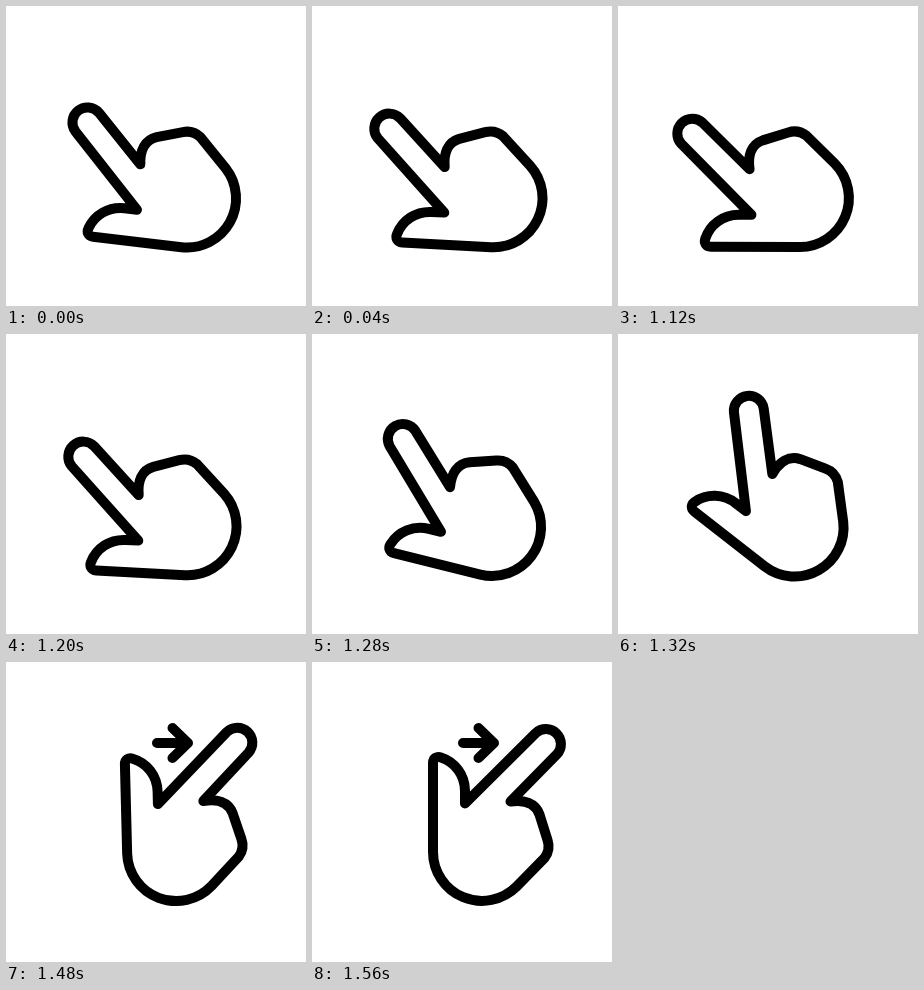
Write an HTML page with a canvas that moves like this. It is 300 px wide and 300 px high and loops after 2.56 s.

```html
<!DOCTYPE html>
<html lang="en">
<head>
<meta charset="utf-8">
<title>Swipe right</title>
<style>
  html, body { margin: 0; width: 100%; height: 100%; overflow: hidden; background: #fff; }
  canvas { display: block; width: 100vw; height: 100vh; }
</style>
</head>
<body>
<canvas id="stage"></canvas>
<script>
const SIZE = 300, LOOP = 2560, STEP = 40, SWING = 480;
const PIVOT = { x: 177, y: 185 };

const canvas = document.getElementById('stage');
const ctx = canvas.getContext('2d');
const ratio = window.devicePixelRatio || 1;
canvas.width = canvas.height = SIZE * ratio;

// Hand in its right-swiped pose
const hand = new Path2D(`
  M121 190 V101 C121 96 125 94 129 95.5
  C143 100 153 113 153 129 V141.5
  L223.7 71.1 A15 15 0 0 1 244.9 92.3 L198.5 139.5
  C212 137.5 223.5 141 227.5 152.5 L235.5 178
  C237.5 184 237 190 232.5 196 L204.6 224.6
  A49 49 0 0 1 121 190 Z`);
const arrow = new Path2D('M151 81 H182 M166.5 66 L182 81 L166.5 96');

// Symmetric cubic Bézier easing (0.9, 0, 0.1, 1)
function ease(x) {
  if (x <= 0) return 0;
  if (x >= 1) return 1;
  let lo = 0, hi = 1;
  for (let i = 0; i < 24; i++) {
    const s = (lo + hi) / 2, r = 1 - s;
    if (2.7 * s * r * r + 0.3 * s * s * r + s * s * s < x) lo = s;
    else hi = s;
  }
  return lo * lo * (3 - 2 * lo);
}

function angleAt(t) {
  if (t < 120) return -90 * ease((t + 324) / SWING);
  return -90 + 90 * ease((t - 1084) / SWING);
}

function draw(t) {
  ctx.setTransform(ratio, 0, 0, ratio, 0, 0);
  ctx.fillStyle = '#fff';
  ctx.fillRect(0, 0, SIZE, SIZE);
  ctx.strokeStyle = '#000';
  ctx.lineWidth = 10;
  ctx.lineCap = ctx.lineJoin = 'round';

  if (t >= 1360) ctx.stroke(arrow);

  ctx.translate(PIVOT.x, PIVOT.y);
  ctx.rotate(angleAt(t) * Math.PI / 180);
  ctx.translate(-PIVOT.x, -PIVOT.y);
  ctx.stroke(hand);
}

const start = performance.now();
function tick() {
  const t = (performance.now() - start) % LOOP;
  draw(Math.floor(t / STEP) * STEP);
  requestAnimationFrame(tick);
}
tick();
</script>
</body>
</html>
```
